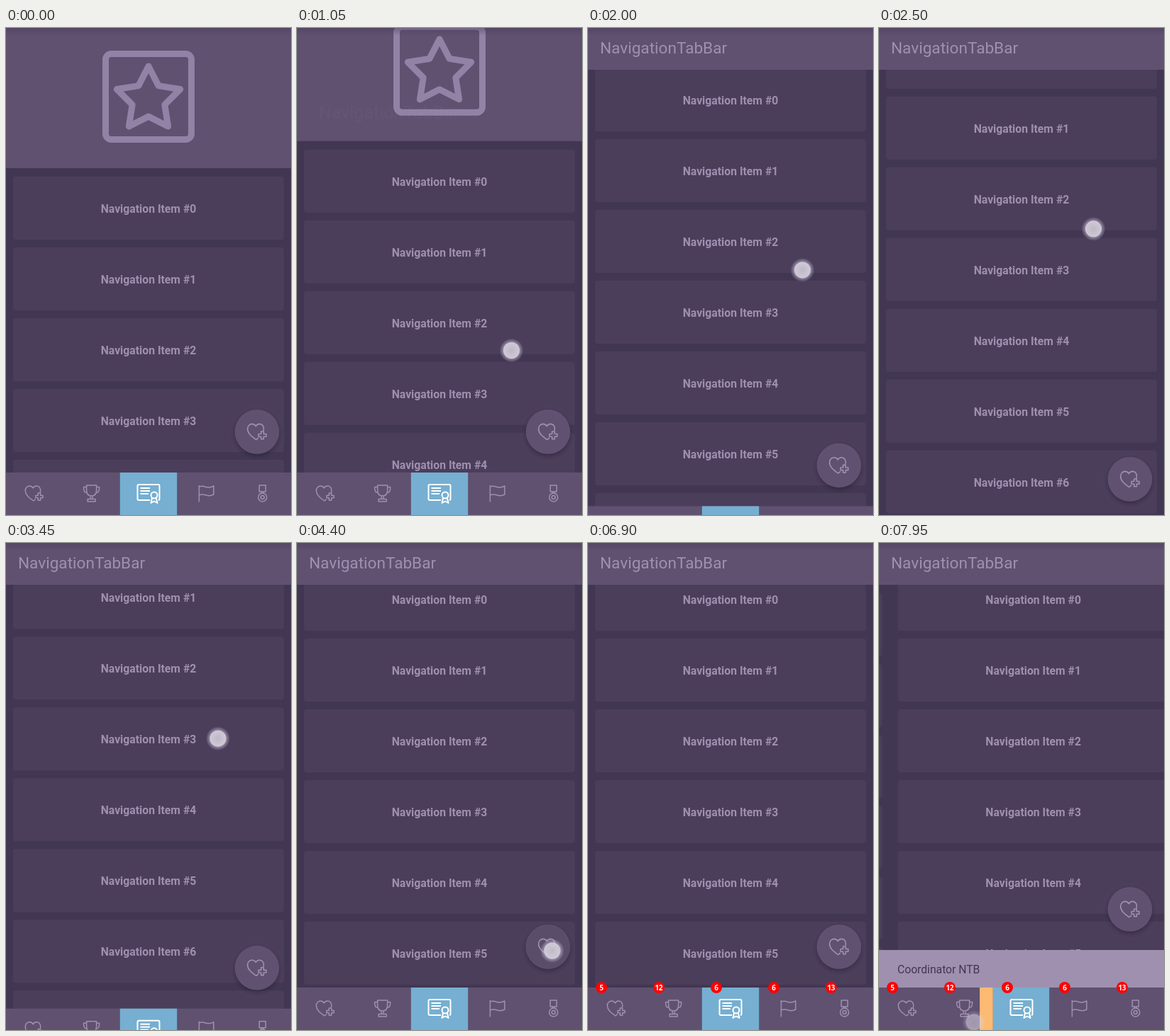
An HTML page with a canvas for the animation above (8 s loop, 402 by 688 pixels).

```html
<!DOCTYPE html>
<html lang="en">
<head>
<meta charset="utf-8">
<title>Tab bar with coordinated scrolling</title>
<style>
html, body { margin: 0; width: 100%; height: 100%; overflow: hidden; background: #423752; }
canvas { display: block; width: 402px; height: 688px; }
</style>
</head>
<body>
<canvas id="stage"></canvas>
<script>
const W = 402, H = 688, LOOP = 8000, TAB = W / 5;
const BG = '#423752', CARD = '#4b3e5b', PANEL = '#605171', LILAC = '#9f90af';
const BLUE = '#76afd1', ORANGE = '#fcba72';
const canvas = document.getElementById('stage'), g = canvas.getContext('2d');
const dpr = window.devicePixelRatio || 1;
canvas.width = W * dpr;
canvas.height = H * dpr;

const icons = {
  heart: 'M1.500 8L-1.500 10.500C-8 6-13 2-13-4C-13-8-10-10.500-7-10.500C-5-10.500-3-9.500-2-7.500' +
    'C-1-9.500 1-10.500 3-10.500C6-10.500 8.500-8 8.500-4.500Q8.500-3 8-1.500' +
    'M5-.5h3.400v3.400h3.400v3.400h-3.400v3.400h-3.400v-3.400h-3.400v-3.400h3.400z',
  trophy: 'M-7-11.500h14v7C7 1 4 3.500 0 3.500C-4 3.500-7 1-7-4.500zM-7-9h-4v2C-11-3-9-1-6-1' +
    'M7-9h4v2C11-3 9-1 6-1M-1.500 3.500v4.500M1.500 3.500v4.500M-5.500 11.500v-3.500h11v3.500z',
  diploma: 'M2 9.500H-13.500Q-15.500 9.500-15.500 7.500V-10.500Q-15.500-12.500-13.500-12.500H13.500' +
    'Q15.500-12.500 15.500-10.500V7.500Q15.500 9.500 14 9.500M-11.500-7.500H2M-11.500-3.500H2M-11.500 .5H0' +
    'M12.500 2.500A4.500 4.500 0 1 1 3.500 2.500A4.500 4.500 0 1 1 12.500 2.500M5 6.500L3.500 13.500L8 11L12.500 13.500L11 6.500',
  flag: 'M-9-11.500V12M-9-9.500C-5-11-2-10-1-9.500C3-8 8-8.500 11.500-10.500V1.500C8 3.500 4 3.500 1 2.500C-2 1.500-6 1-9 2.500',
  medal: 'M-4.500-11.500h9v9h-9zM-1.500-2.500v2M1.500-2.500v2M6 5.500A6 6 0 1 1-6 5.500A6 6 0 1 1 6 5.500' +
    'M2.500 5.500A2.500 2.500 0 1 1-2.500 5.500A2.500 2.500 0 1 1 2.500 5.500'
};
for (const name in icons) icons[name] = new Path2D(icons[name]);
const tabs = Object.keys(icons);
const firstCounts = [10, 14, 6, 0, 11], nextCounts = [5, 12, 6, 6, 13];

const clamp = v => Math.min(1, Math.max(0, v));
const ramp = (t, start, length) => clamp((t - start) / length);
const easeOut = p => 1 - (1 - p) ** 3;

// cubic-bezier(.4, 0, .2, 1)
function ease(p) {
  let lo = 0, hi = 1;
  for (let i = 0; i < 20; i++) {
    const u = (lo + hi) / 2, v = 1 - u;
    if (1.2 * u * v * v + .6 * u * u * v + u ** 3 < p) lo = u; else hi = u;
  }
  return lo * lo * (3 - 2 * lo);
}

// Smooth curve through [time, value] points, at rest before and after
function curve(keys, t) {
  const last = keys.length - 1;
  if (t <= keys[0][0]) return keys[0][1];
  if (t >= keys[last][0]) return keys[last][1];
  const i = keys.findIndex(k => k[0] > t) - 1;
  const slope = n => n < 1 || n >= last ? 0 :
    (keys[n + 1][1] - keys[n - 1][1]) / (keys[n + 1][0] - keys[n - 1][0]);
  const [t0, a] = keys[i], [t1, b] = keys[i + 1], d = t1 - t0, u = (t - t0) / d, v = 1 - u;
  return a * v * v * (1 + 2 * u) + b * u * u * (3 - 2 * u) +
    d * u * v * (slope(i) * v - slope(i + 1) * u);
}

const scrollKeys = [[680, 0], [1000, 32], [1550, 103], [2500, 213], [2800, 280], [3150, 300], [3450, 278], [3880, 175]];

// Each touch: fade-in start, fade-out start, fade length, x, path of y
const touches = [
  [600, 2750, 100, 302.5, [[650, 503], [1000, 462], [1550, 390], [2500, 284], [2800, 216]]],
  [3080, 3700, 120, 299, [[3150, 250], [3450, 276], [3820, 365]]],
  [4300, 4500, 65, 360, [[0, 576]]],
  [5400, 5600, 65, 357, [[0, 584]]],
  [7800, 8000, 300, 134, [[0, 677]]]
];

function box(x, y, w, h, color, r = 0) {
  g.fillStyle = color;
  g.beginPath();
  g.roundRect(x, y, w, h, r);
  g.fill();
}

function disc(x, y, r, color) {
  g.fillStyle = color;
  g.beginPath();
  g.arc(x, y, r, 0, 7);
  g.fill();
}

function text(str, x, y, font, color, align = 'left') {
  g.font = font;
  g.fillStyle = color;
  g.textAlign = align;
  g.fillText(str, x, y);
}

function icon(name, x, y, color, width, scale = 1) {
  g.save();
  g.translate(x, y);
  g.scale(scale, scale);
  g.strokeStyle = color;
  g.lineWidth = width;
  g.lineJoin = 'round';
  g.stroke(icons[name]);
  g.restore();
}

function drawPage(x, top, labelled) {
  for (let i = 0; i < 10; i++) {
    const y = top + i * 100;
    if (y > H || y < -100) continue;
    box(x + 10, y, 382, 89, CARD, 4);
    if (labelled) text('Navigation Item #' + i, x + 201, y + 51, 'bold 15.75px Roboto, sans-serif', LILAC, 'center');
  }
}

function drawHeader(scroll) {
  const up = Math.min(scroll, 139), f = up / 139, bottom = 198 - up;
  g.save();
  box(0, 0, W, bottom, PANEL);
  g.beginPath();
  g.rect(0, 0, W, bottom);
  g.clip();
  g.globalAlpha = 1 - ramp(up, 112, 26);
  g.strokeStyle = '#9282a5';
  g.lineJoin = 'round';
  g.lineWidth = 9;
  g.beginPath();
  g.roundRect(140.5, 36.5 - up, 121, 121, 8);
  g.stroke();
  g.beginPath();
  for (let i = 0; i < 10; i++) {
    const a = (i / 5 - .5) * Math.PI, r = i % 2 ? 24 : 47;
    g.lineTo(201 + r * Math.cos(a), 101 - up + r * Math.sin(a));
  }
  g.closePath();
  g.stroke();
  g.globalAlpha = f * f;
  text('NavigationTabBar', 36 - 19 * f, 163 - 127 * f, 22.6 * (1.15 - .15 * f) + 'px Roboto, sans-serif', LILAC);
  g.restore();
  const shade = g.createLinearGradient(0, 0, 0, 11);
  shade.addColorStop(0, 'rgba(66,55,82,.4)');
  shade.addColorStop(1, 'rgba(66,55,82,0)');
  box(0, 0, W, 11, shade);
}

function drawFab(y, pressed) {
  g.save();
  g.shadowColor = 'rgba(30,22,42,.5)';
  g.shadowBlur = 7 * dpr;
  g.shadowOffsetY = 3 * dpr;
  disc(354, y, 31, PANEL);
  g.restore();
  disc(354, y, 31, `rgba(75,66,82,${.4 * pressed})`);
  g.strokeStyle = 'rgba(159,144,175,.15)';
  g.lineWidth = 1;
  g.stroke();
  icon('heart', 354.5, y, LILAC, 1.5, 1.06);
}

function drawSnackbar(shown, textAlpha) {
  if (!shown) return;
  const y = 628 - 53 * shown;
  box(0, y, W, 53, LILAC);
  g.globalAlpha = textAlpha;
  text('Coordinator NTB', 26, y + 33, '15.7px Roboto, sans-serif', BG);
  g.globalAlpha = 1;
}

function drawBar(y, slide) {
  box(0, y, W, 60, PANEL);
  const edge = 2 * TAB, left = edge - 18 * slide;
  box(left, y, edge - left, 60, ORANGE);
  box(edge, y, TAB - slide, 60, BLUE);
  tabs.forEach((name, i) => {
    const active = i === 2;
    icon(name, (i + .5) * TAB, y + 29.5, active ? '#fff' : LILAC, active ? 2 : 1.5);
  });
}

function drawBadges(t) {
  for (let i = 0; i < 5; i++) {
    const update = 5750 + 100 * i;
    let scale = easeOut(ramp(t, 4550 + 100 * i, 200));
    if (t > update) scale = Math.min(1, Math.abs(t - update - 100) / 100);
    if (scale < .02) continue;
    const count = (t < update + 100 ? firstCounts : nextCounts)[i];
    g.save();
    g.translate(19 + 81 * i, 628);
    g.scale(scale, scale);
    disc(0, 0, 8, '#f00');
    g.letterSpacing = '-0.6px';
    text(count, -.3, 3.6, 'bold condensed 10px "Open Sans", "DejaVu Sans", sans-serif', '#fff', 'center');
    g.restore();
  }
}

function drawTouch(t, [start, end, fade, x, path]) {
  const alpha = ramp(t, start, fade) * (1 - ramp(t, end, fade));
  if (!alpha) return;
  const y = curve(path, t);
  const glow = g.createRadialGradient(x, y, 11, x, y, 17);
  glow.addColorStop(0, 'rgba(225,215,240,.6)');
  glow.addColorStop(1, 'rgba(225,215,240,0)');
  g.globalAlpha = alpha * .9;
  disc(x, y, 17, glow);
  const core = g.createRadialGradient(x, y, 0, x, y, 11.5);
  core.addColorStop(0, '#c2bbc8');
  core.addColorStop(1, '#d6d0dc');
  disc(x, y, 11.5, core);
  g.globalAlpha = 1;
}

function draw(t) {
  const scroll = curve(scrollKeys, t);
  const hidden = 67 * easeOut(ramp(t, 1900, 300)) * (1 - easeOut(ramp(t, 3380, 300)));
  const shift = 16 * Math.max(0, (t - 7900) / 50) ** 2;
  const second = t > 7000, showAt = second ? 7040 : 5533;
  const shown = ease(ramp(t, showAt, 250)) * (second ? 1 : 1 - ease(ramp(t, 6645, 250)));
  const textAlpha = ramp(t, showAt + 70, 180) * (second ? 1 : 1 - ramp(t, 6645, 180));
  const press = start => ramp(t, start, 150) * (1 - ramp(t, start + 250, 250));

  g.setTransform(dpr, 0, 0, dpr, 0, 0);
  box(0, 0, W, H, BG);
  drawPage(shift, 210 - scroll, true);
  if (shift) drawPage(shift - W - 2, 71, false);
  drawHeader(scroll);
  drawSnackbar(shown, textAlpha);
  drawFab(570.5 + hidden - 53 * shown, press(4300) + press(5400));
  drawBar(628 + hidden, shift / 16);
  drawBadges(t);
  touches.forEach(touch => drawTouch(t, touch));
}

const began = performance.now();
function tick() {
  draw((performance.now() - began) % LOOP);
  requestAnimationFrame(tick);
}
tick();
</script>
</body>
</html>
```
